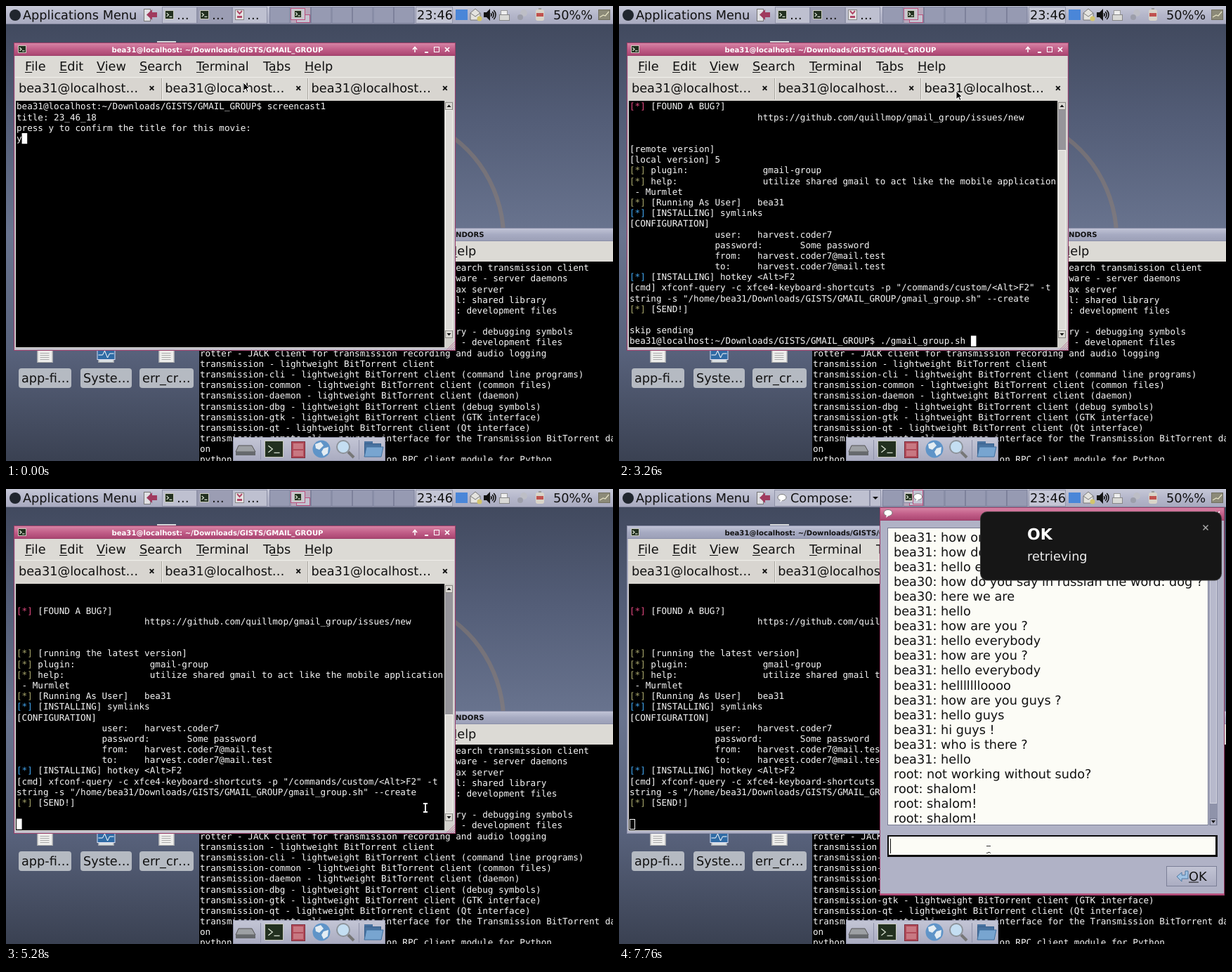
An HTML page with a canvas for the animation above (8 s loop, 864x648 px).

```html
<!DOCTYPE html>
<html lang="en">
<head>
<meta charset="utf-8">
<title>Desktop session</title>
<style>
html, body { margin: 0; height: 100%; overflow: hidden; background: #454d62; }
canvas { display: block; }
</style>
</head>
<body>
<canvas id="stage" width="864" height="648"></canvas>
<script>
const ctx = document.getElementById('stage').getContext('2d');
ctx.textRendering = 'geometricPrecision';

const LOOP = 8000, DIALOG_AT = 6200, COMPOSE_AT = 6320;
const SCALE = 0.949, CELL = 8 * SCALE, ROW = 16 * SCALE;
const SANS = '"DejaVu Sans", sans-serif';
const UI = '17.7px ' + SANS, TITLE = 'bold 10.1px ' + SANS;
const MONO = '13.29px "DejaVu Sans Mono", monospace';
const LILAC = '#b0b2c6', GREY = '#dcdad5', PINK = '#b9527e';
const MARKS = { P: '#e0487f', Y: '#a8a66c', B: '#41a4ee' };

const USER = 'bea31', MAIL = 'harvest.coder7';
const HOST = USER + '@localhost';
const PROMPT = HOST + ':~/Downloads/GISTS/GMAIL_GROUP$ ';

// A leading letter before "[*]" picks the colour of the mark.
const field = (name, value, col = 24) => ' '.repeat(16) + name.padEnd(col - 16) + value;
const bug = ['P[*] [FOUND A BUG?]', ' '.repeat(24) + 'https://github.com/quillmop/gmail_group/issues/new', '', ''];
const report = [
  'Y[*] plugin:              gmail-group',
  'Y[*] help:                utilize shared gmail to act like the mobile application',
  ' - Murmlet',
  'Y[*] [Running As User]   ' + USER,
  'B[*] [INSTALLING] symlinks',
  '[CONFIGURATION]',
  field('user:', MAIL),
  field('password:', 'Some password', 32),
  field('from:', MAIL + '@mail.test'),
  field('to:', MAIL + '@mail.test'),
  'B[*] [INSTALLING] hotkey <Alt>F2',
  '[cmd] xfconf-query -c xfce4-keyboard-shortcuts -p "/commands/custom/<Alt>F2" -t',
  'string -s "/home/' + USER + '/Downloads/GISTS/GMAIL_GROUP/gmail_group.sh" --create',
  'Y[*] [SEND!]', ''];
const firstRun = [...bug, '[remote version]', '[local version] 5', ...report, 'skip sending'];
const secondRun = ['', '', ...bug, 'Y[*] [running the latest version]', ...report];
const recorder = 'ffmpeg -f x11grab -s 1024x768 -r 25 -i :0.0 -c:v libx264 -preset ultrafast -crf 0 23_46_18.mkv';
const castStart = [PROMPT + 'screencast1', 'title: 23_46_18', 'press y to confirm the title for this movie:', 'y'];
const output = [[4080, 6], [4530, 10], [4600, 11], [4730, 12], [4770, 17], [4900, 18], [5000, 20], [5100, 22]];

const packages = ['earch transmission client', 'ware - server daemons', 'ax server', 'l: shared library',
  ': development files', '', 'ry - debugging symbols', ' - development files'].map(s => ' '.repeat(48) + s).concat(
  'rotter - JACK client for transmission recording and audio logging',
  ['', '-cli', '-common', '-daemon', '-dbg', '-gtk', '-qt'].map((s, i) => `transmission${s} - lightweight BitTorrent client` +
    ['', ' (command line programs)', ' (common files)', ' (daemon)', ' (debug symbols)', ' (GTK interface)', ' (Qt interface)'][i]),
  'transmission-remote-cli - ncurses interface for the Transmission BitTorrent daem', 'on',
  'python-transmissionrpc - Transmission RPC client module for Python');

const chat = ['how or', 'how do', 'hello everybody', '*how do you say in russian the word: dog ?', '*here we are',
  'hello', 'how are you ?', 'hello everybody', 'how are you ?', 'hello everybody', 'helllllloooo'.replace('llllll', 'lllllll'),
  'how are you guys ?', 'hello guys', 'hi guys !', 'who is there ?', 'hello']
  .map(s => s[0] === '*' ? 'bea30: ' + s.slice(1) : USER + ': ' + s)
  .concat('root: not working without sudo?', Array(3).fill('root: shalom!'));

const pointerPath = [[0, 338, 109], [1240, 338, 109], [1330, 395, 127], [1460, 467, 106], [1669, 467, 106],
  [1670, 475, 102], [1740, 480, 121], [4530, 480, 121], [4620, 478, 180], [4730, 461, 245], [5280, 597, 454],
  [5470, 597, 454], [5700, 700, 380], [5920, 795, 322], [6050, 802, 357], [6199, 802, 357], [6200, 805, 352],
  [6300, 805, 352], [6820, 650, 560], [6990, 650, 560], [7350, 526, 513], [LOOP, 526, 513]];

function box(x, y, w, h, fill, edge) {
  if (fill) { ctx.fillStyle = fill; ctx.fillRect(x, y, w, h); }
  if (edge) { ctx.strokeStyle = edge; ctx.lineWidth = 1; ctx.strokeRect(x + .5, y + .5, w - 1, h - 1); }
}
function round(x, y, w, h, r, fill) {
  ctx.fillStyle = fill;
  ctx.beginPath(); ctx.roundRect(x, y, w, h, r); ctx.fill();
}
function disc(x, y, r, fill) { round(x - r, y - r, 2 * r, 2 * r, r, fill); }
function path(points, stroke, width = 1, fill) {
  ctx.beginPath();
  for (let i = 0; i < points.length; i += 2) ctx.lineTo(points[i], points[i + 1]);
  if (fill) { ctx.closePath(); ctx.fillStyle = fill; ctx.fill(); }
  if (stroke) { ctx.strokeStyle = stroke; ctx.lineWidth = width; ctx.stroke(); }
}
function text(s, x, y, fill = '#111', font = UI, align = 'left') {
  ctx.font = font; ctx.textAlign = align; ctx.fillStyle = fill;
  ctx.fillText(s, x, y);
}
function menuText(s, x, y, key = 0) {
  text(s, x, y);
  const left = x + ctx.measureText(s.slice(0, key)).width;
  box(left, y + 2, ctx.measureText(s[key]).width, 1, '#111');
}
function shade(y, h, ...colors) {
  const g = ctx.createLinearGradient(0, y, 0, y + h);
  colors.forEach((c, i) => g.addColorStop(i / (colors.length - 1), c));
  return g;
}
function cross(x, y, r, color, width = 1.7) {
  path([x - r, y - r, x + r, y + r], color, width);
  path([x - r, y + r, x + r, y - r], color, width);
}
function terminalText(lines, x, y) {
  ctx.save();
  ctx.translate(x, y); ctx.scale(SCALE, SCALE);
  lines.forEach((line, i) => {
    const mark = line[1] === '[' && MARKS[line[0]];
    if (mark) {
      text('[*]', 0, i * 16 + 12.5, mark, MONO);
      line = '   ' + line.slice(4);
    }
    text(line, 0, i * 16 + 12.5, '#f6f6f6', MONO);
  });
  ctx.restore();
}
function titleBar(x, y, w, h, active) {
  box(x, y, w, h, active ? shade(y, h, '#d988a8', '#c25f89', '#a8436f') : shade(y, h, '#c3c6d8', '#a7abc2', '#9a9eb6'),
    active ? '#9b3d68' : '#8a8ea8');
}
function consoleIcon(x, y, w, h) {
  box(x, y, w, h, '#22301f', '#c9cbbd');
  path([x + w * .2, y + h * .3, x + w * .42, y + h * .5, x + w * .2, y + h * .7], '#dfe8d8', 1.2);
  path([x + w * .5, y + h * .72, x + w * .8, y + h * .72], '#dfe8d8', 1.2);
}
function bubble(x, y) {
  ctx.fillStyle = '#fff'; ctx.strokeStyle = '#777'; ctx.lineWidth = 1;
  ctx.beginPath(); ctx.ellipse(x, y - 1, 6, 4.5, 0, 0, 7); ctx.fill(); ctx.stroke();
  path([x - 2, y + 2, x - 3, y + 6, x + 2, y + 2], null, 1, '#fff');
}

function desktop() {
  box(0, 0, 864, 648, shade(0, 648, '#3e465a', '#535d77', '#69748f', '#59637d', '#3a4152'));
  ctx.strokeStyle = 'rgba(150,128,112,.45)'; ctx.lineWidth = 6;
  ctx.beginPath(); ctx.arc(530, 330, 178, -1, .2); ctx.stroke();
  box(215, 50, 27, 3, '#d6d8da');
  [['app-fi…', 18, 75], ['Syste…', 106, 73], ['err_cr…', 190, 77]].forEach(([label, x, w], i) => {
    const mid = x + w / 2;
    box(mid - 11, 480, 22, 28, i === 1 ? '#d8dee2' : '#eeeeec', '#aaa');
    if (i === 1) {
      box(mid - 13, 484, 26, 20, '#2f6ba5', '#dde');
      path([mid - 11, 497, mid - 5, 497, mid - 2, 491, mid + 2, 501, mid + 5, 495, mid + 11, 495], '#fff');
    } else for (let y = 494; y < 506; y += 3) box(mid - 7, y, 13, 1, '#aaa');
    round(x, 516, w, 28, 4, '#b5bac2');
    text(label, x + 4, 536);
  });
}

function backWindow() {
  titleBar(274, 316, 620, 19, false);
  text('NDORS', 640, 329, '#111', TITLE);
  box(275, 335, 600, 29, GREY);
  menuText('Help', 629, 355);
  box(275, 364, 600, 290, '#000');
  terminalText(packages, 276, 365.3);
}

function dock() {
  box(323, 614, 217, 34, shade(614, 34, '#c4c6d6', '#a9abc0'), '#8e91a8');
  path([331, 626, 350, 626, 355, 635, 327, 635], '#555', 1, '#9da0a4');
  box(327, 635, 28, 5, '#66696d');
  box(362, 618, 1, 28, '#8e91a8');
  consoleIcon(368, 619, 27, 24);
  box(406, 620, 20, 24, '#b04a58', '#7f2d3c');
  box(409, 623, 14, 8, '#c87882'); box(409, 633, 14, 8, '#c87882');
  disc(449, 631, 12.5, '#5f94c8');
  path([440, 624, 448, 621, 452, 626, 446, 632, 441, 630], null, 1, '#e4edf3');
  path([452, 630, 459, 628, 458, 637, 452, 641, 449, 635], null, 1, '#e4edf3');
  path([487, 635, 495, 643], '#777', 4);
  disc(480, 628, 10, '#8d939a'); disc(480, 628, 8, '#c4def2');
  box(502, 618, 1, 28, '#8e91a8');
  box(510, 620, 12, 6, '#49729f');
  box(510, 623, 24, 19, '#49729f', '#365f8d');
  path([513, 628, 537, 628, 534, 642, 510, 642], '#41709f', 1, '#78a5d0');
}

function panel(t) {
  box(0, 0, 864, 26, shade(0, 26, '#c6c8d7', '#b4b6ca', '#a8aabf'));
  box(0, 25, 864, 1, '#85889f');
  disc(13, 13, 8, '#20262e');
  text('Applications Menu', 24, 19);
  box(196, 4, 10, 18, '#e1e1e4', '#777');
  path([215, 9, 208, 9, 208, 5, 200, 12.5, 208, 20, 208, 16, 215, 16], null, 1, '#a03a5e');

  const composing = t >= COMPOSE_AT;
  if (composing) {
    box(221, 1, 136, 24, '#bec0d0', '#8f92a8');
    bubble(232, 13);
    text('Compose:', 244, 19);
    box(357, 1, 16, 24, '#bec0d0', '#8f92a8');
    path([361, 11, 369, 11, 365, 15], null, 1, '#111');
  } else [222, 272, 322].forEach((x, i) => {
    box(x, 1, 50, 24, i === 1 ? '#9b9db3' : '#bec0d0', '#8f92a8');
    if (i < 2) consoleIcon(x + 4, 6, 13, 13);
    else {
      box(x + 4, 5, 13, 15, '#e6e4e4', '#888');
      path([x + 7, 7, x + 10.5, 11, x + 14, 7], '#b04968', 2);
      box(x + 7, 14, 7, 3, '#b04968');
    }
    text('…', x + 21, 19);
  });

  for (let i = 0; i < 7; i++) box(375 + i * 29.5, 1, 29.5, 24, i === 1 ? '#b9a7bb' : '#969ab2', '#7d819b');
  box(413, 12, 20, 12, '#c4c4d1', PINK);
  box(405, 3, 21, 17, '#c9c6d0', composing ? '#8589a3' : PINK);
  consoleIcon(composing ? 407 : 410, 6, 11, 11);
  if (composing) { box(418, 1, 15, 21, '#c2c3d2', PINK); bubble(425.5, 12); }

  box(583, 1, 53, 24, '#c4c6d5', '#9295aa');
  text('23:46', 585, 19);
  box(640, 5, 17, 15, '#4a86d8');
  path([661, 10, 668, 4, 675, 10, 675, 20, 661, 20], '#777', 1, '#e4e3df');
  path([661, 10, 668, 15, 675, 10], '#777');
  disc(674, 18, 3.5, '#d2c46c');
  path([680, 9, 684, 9, 689, 4, 689, 21, 684, 16, 680, 16], null, 1, '#111');
  ctx.strokeStyle = '#111'; ctx.lineWidth = 1.6;
  for (const r of [3, 6, 9]) { ctx.beginPath(); ctx.arc(688, 12.5, r, -.8, .8); ctx.stroke(); }
  box(704, 6, 10, 7, '#eee', '#999'); box(702, 12, 15, 9, '#d9d9d6', '#888');
  disc(737, 10, 5, '#bdbec6'); disc(732, 16, 4, '#9c9eaa');
  round(754, 5, 12, 16, 3, '#d9d4c8'); box(755, 10, 10, 5, '#c0514e'); box(758, 3, 4, 2, '#999');
  text('50%%', 779, 19);
  box(843, 5, 17, 15, '#8c8a78', '#716f60');
  path([845, 16, 850, 13, 853, 14, 858, 8], '#e6e2c4', 1.2);
}

function terminalState(t) {
  if (t < 60) return { lines: castStart, thumb: 148 };
  if (t < 1670) return { lines: [...castStart, recorder.slice(0, 80), recorder.slice(80), ''], thumb: 148 };
  if (t < 4080) return {
    lines: [...firstRun, PROMPT + (t < 2610 ? '' : './gmail_group.sh ')],
    thumb: t < 3260 ? 195 : 205
  };
  const shown = output.filter(([at]) => t >= at).pop()[1];
  return { lines: [...secondRun.slice(0, shown), ''], thumb: 321 };
}

function mainWindow(t) {
  const active = t < DIALOG_AT, { lines, thumb } = terminalState(t);
  box(11, 52, 629, 439, active ? '#c1bfca' : LILAC, active ? '#9b3d68' : '#8a8ea8');
  titleBar(11, 52, 629, 19, active);
  const ink = active ? '#fff' : '#111';
  consoleIcon(17, 56, 12, 11);
  text(HOST + ': ~/Downloads/GISTS/GMAIL_GROUP', 301, 65.5, ink, TITLE, 'center');
  path([579, 62, 582, 58.5, 585, 62], ink, 1.5); path([582, 59, 582, 66], ink, 1.5);
  box(596, 65, 5, 2, ink); box(609, 58, 8, 8, null, ink); cross(628, 62, 3, ink);

  box(13, 71, 625, 416, GREY);
  [['File', 27], ['Edit', 76], ['View', 129], ['Search', 190], ['Terminal', 271], ['Tabs', 366, 1], ['Help', 425]]
    .forEach(([s, x, key]) => menuText(s, x, 92, key));
  const tab = t < 1670 ? 1 : 2;
  box(13, 101, 625, 1, '#efede9');
  [0, 1, 2].forEach(i => {
    const x = 13 + i * 208.7;
    if (i !== tab) box(x, 103, 208, 31, '#d8d5d0');
    if (i) { box(Math.round(x) - 1, 103, 1, 30, '#a9a69f'); box(Math.round(x), 103, 1, 30, '#f5f3f0'); }
    text(HOST + '…', 18 + i * 208.3, 123);
    cross(207.5 + i * 208.7, 117, 2.8, '#111', 1.9);
  });

  box(14, 135, 610, 351, '#000');
  terminalText(lines, 15, 135.5);
  const last = lines.length - 1;
  const cx = 15 + lines[last].length * CELL, cy = 135.5 + last * ROW;
  if (active) box(cx, cy, CELL, ROW, '#fff');
  else box(15, 470, 8, 15, null, '#fff');

  box(624, 135, 13, 352, '#d2d0cb');
  box(625, 148, 11, 314, '#96949a');
  box(625, thumb, 11, 462 - thumb, '#dddbd7', '#f3f1ee');
  box(625, 137, 11, 11, GREY, '#8c8a86'); box(625, 462, 11, 11, GREY, '#8c8a86');
  path([627.5, 144, 630.5, 140.5, 633.5, 144], null, 1, '#111');
  path([627.5, 466, 630.5, 469.5, 633.5, 466], null, 1, '#111');
  for (let d = 3; d < 13; d += 3) path([639 - d, 490, 639, 490 - d], active ? '#b77b98' : '#8a8ea8');
}

function dialog() {
  box(371, 26, 491, 553, LILAC, '#9b3d68');
  titleBar(371, 26, 491, 19, true);
  box(372, 576, 489, 2, PINK);
  bubble(383, 35);
  cross(852, 35, 3, '#fff');
  box(382, 55, 457, 424, '#fcfcf6', '#777b92');
  ctx.save();
  ctx.beginPath(); ctx.rect(383, 56, 455, 422); ctx.clip();
  chat.flat().forEach((s, i) => text(s, 391, 74.5 + i * 21.1));
  ctx.restore();
  box(840, 56, 12, 423, '#8f93aa');
  box(841, 67, 10, 381, '#b7b9cc', '#d2d3df');
  box(841, 469, 10, 10, LILAC, '#777b92');
  path([843, 472, 849, 472, 846, 476], null, 1, '#111');
  box(382, 493, 470, 31, '#0a0a0a');
  box(384, 495, 465, 26, '#fcfcf6');
  box(386, 498, 1, 21, '#111');
  box(779, 537, 72, 29, shade(537, 29, '#c3c5d5', '#aaacc1'), '#7b7f97');
  path([794, 552, 801, 546, 801, 550, 806, 550, 806, 544, 810, 544, 810, 555, 801, 555, 801, 559], '#4f79a3', 1, '#9fc3e4');
  menuText('OK', 811, 557.5);
  round(514, 32, 344, 98.5, 10, '#3a3a3a');
  round(515, 33, 342, 96.5, 9, '#161616');
  text('OK', 581, 72, '#fff', 'bold 22px ' + SANS);
  text('retrieving', 581, 102, '#eee');
  cross(835, 55, 3.5, '#aaa', 1.5);
}

function pointer(t) {
  if (t >= 7720 && t < 7760) return;
  const i = pointerPath.findIndex(p => p[0] > t);
  const [t0, x0, y0] = pointerPath[i - 1], [t1, x1, y1] = pointerPath[i];
  const k = (t - t0) / (t1 - t0), x = Math.round(x0 + (x1 - x0) * k), y = Math.round(y0 + (y1 - y0) * k);
  const inDialog = t >= DIALOG_AT;
  const overText = inDialog
    ? x > 383 && x < 838 && (y < 478 || y > 494 && y < 523)
    : x < 624 && y > 135 && y < 487;
  if (!overText) {
    path([x, y, x, y + 12, x + 3, y + 9, x + 5, y + 13.5, x + 7, y + 12.5, x + 5, y + 8.5, x + 8.5, y + 8.5], '#fff', 1, '#000');
  } else if (inDialog) {
    box(x - 3, y - 5, 6, 1, '#333'); box(x - 3, y + 5, 2, 1, '#333'); box(x - 1, y + 4, 3, 1, '#333'); box(x + 2, y + 5, 1, 1, '#333');
  } else {
    box(x - 1, y - 6, 2, 12, '#fff');
    box(x - 3, y - 7, 6, 2, '#fff'); box(x - 3, y + 5, 6, 2, '#fff');
  }
}

const start = performance.now();
function draw() {
  const t = (performance.now() - start) % LOOP;
  desktop();
  backWindow();
  mainWindow(t);
  dock();
  panel(t);
  if (t >= DIALOG_AT) dialog();
  pointer(t);
  requestAnimationFrame(draw);
}
draw();
</script>
</body>
</html>
```
